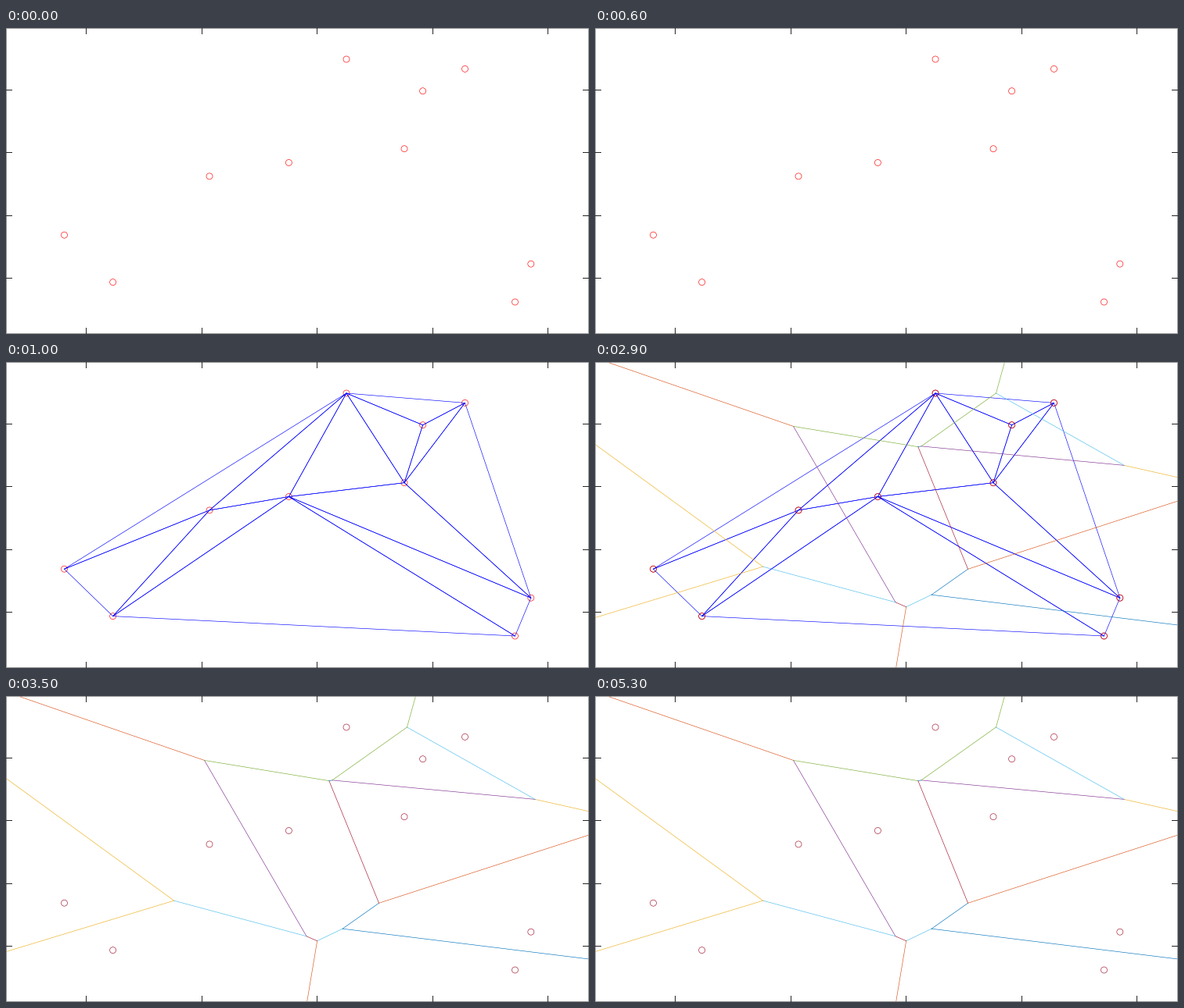
Write a matplotlib script that moves like this. It is 745 by 392 pixels and loops after 6.5 s.

```python
from itertools import combinations, cycle

import matplotlib.pyplot as plt
import numpy as np
from matplotlib.animation import FuncAnimation

W, H, DPI = 745, 392, 100
STEP_MS, STEPS = 500, 13
PX = 72 / DPI
THIN = 0.62 * PX
TICK = 7
UNIT = np.array([147.5, 80.3])  # pixels per data unit

CRIMSON = "#a2142f"
PALETTE = ["#4dbeee", CRIMSON, "#0072bd", "#d95319", "#edb120", "#7e2f8e", "#77ac30"]

# The first HULL sites run clockwise around the outline.
HULL = 6
SITES = np.array([
    (586.5, 52.4), (670.8, 302.2), (650.5, 351), (136.6, 325.6), (74.5, 265.2),
    (435, 40), (260, 189.9), (361.4, 172.5), (509, 154.7), (532.6, 80.7)])

# Delaunay triangles; their order sets the order of the cell edges.
TRIANGLES = [(2, 3, 7), (1, 2, 7), (4, 5, 6), (5, 6, 7), (3, 6, 7), (3, 4, 6),
             (5, 7, 8), (0, 1, 8), (1, 7, 8), (5, 8, 9), (0, 8, 9), (0, 5, 9)]

fig = plt.figure(figsize=(W / DPI, H / DPI), dpi=DPI, facecolor="white")
ax = fig.add_axes([0, 0, 1, 1])
ax.set_xlim(0, W)
ax.set_ylim(H, 0)
ax.axis("off")


def path(points, color, **style):
    style = {"lw": THIN, "snap": False, **style}
    return ax.plot(*np.transpose(points), color=color, **style)[0]


def circles(color, z):
    return ax.scatter(*SITES.T, s=(8 * PX) ** 2, facecolors="none",
                      edgecolors=color, linewidths=THIN, snap=False, zorder=z)


def draw_box():
    right, bottom = W - 1, H - 1
    crisp = dict(lw=PX, snap=True, antialiased=False, zorder=8)
    path([(0, 0), (right, 0), (right, bottom), (0, bottom), (0, 0)],
         "#929292", **crisp)
    for x in 102.6 + UNIT[0] * np.arange(5):
        for y in (0, bottom - TICK):
            path([(int(x), y), (int(x), y + TICK)], "#262626", **crisp)
    for y in 79.6 + UNIT[1] * np.arange(4):
        for x in (0, right - TICK):
            path([(x, int(y)), (x + TICK, int(y))], "#262626", **crisp)


def circumcentre(triangle):
    a, b, c = SITES[list(triangle)] / UNIT
    sides = np.array([b - a, c - a])
    return (a + np.linalg.solve(2 * sides, (sides ** 2).sum(axis=1))) * UNIT


def cell_edges():
    centres = [circumcentre(t) for t in TRIANGLES]
    for i, j in combinations(range(len(TRIANGLES)), 2):
        if len(set(TRIANGLES[i]) & set(TRIANGLES[j])) == 2:
            yield centres[i], centres[j]
    # Open cells: rays leave at right angles to the hull sides.
    for i in range(HULL):
        j = (i + 1) % HULL
        owner = next(k for k, t in enumerate(TRIANGLES) if {i, j} <= set(t))
        dx, dy = (SITES[j] - SITES[i]) / UNIT
        yield centres[owner], centres[owner] + 20 * np.array([dy, -dx]) * UNIT


draw_box()
red_sites = [circles("red", 2)]
# Shared sides are stroked twice, so the hull looks lighter.
mesh = [path(SITES[[a, b, c, a]], "blue", zorder=3) for a, b, c in TRIANGLES]
cells = [path(edge, color, zorder=4)
         for edge, color in zip(cell_edges(), cycle(PALETTE))]
cells.append(circles(CRIMSON, 5))


def show(artists, visible):
    for artist in artists:
        artist.set_visible(visible)


def update(step):
    t = step * STEP_MS
    show(red_sites, t < 3500)
    show(mesh, 1000 <= t < 3500)
    show(cells, t >= 2000)
    return red_sites + mesh + cells


anim = FuncAnimation(fig, update, frames=STEPS, interval=STEP_MS,
                     init_func=lambda: update(0), repeat=True, repeat_delay=0)
plt.show()
```
